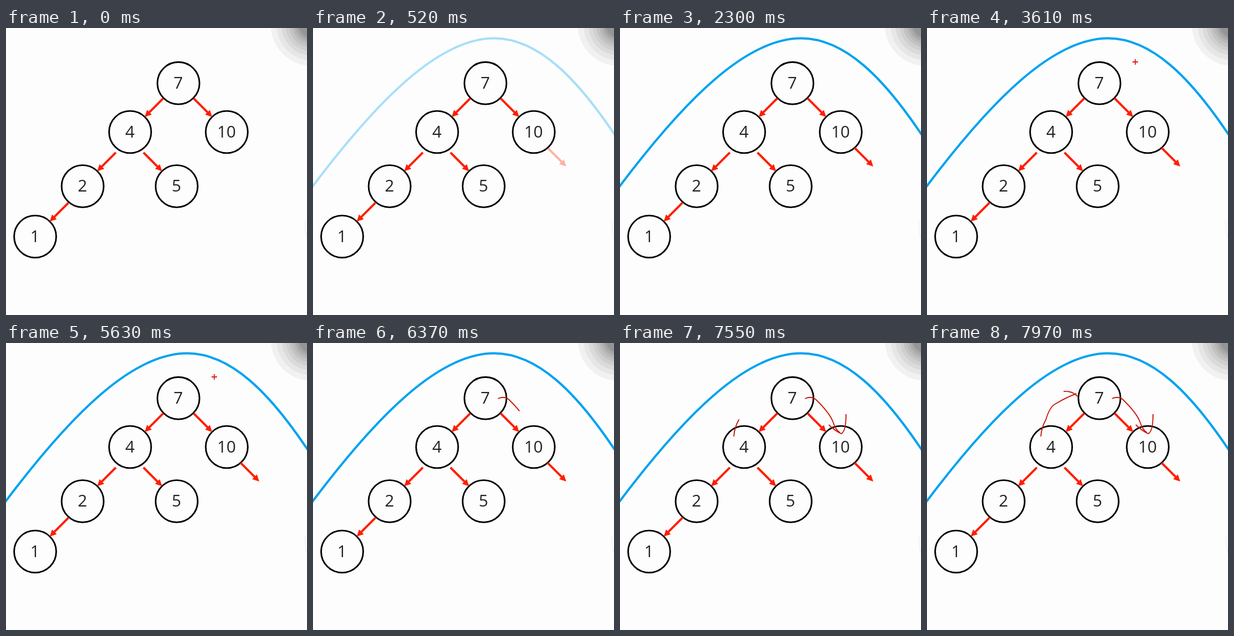
Write an HTML page that moves like this. It is 542x516 px and loops after 8000 ms.

```html
<!DOCTYPE html>
<html lang="en">
<head>
<meta charset="utf-8">
<title>Binary tree</title>
<style>
html, body { margin: 0; width: 100%; height: 100%; overflow: hidden; background: #fdfdfd; }
svg { display: block; width: 100vw; height: 100vh; }
text { font: 29.5px "Open Sans", "Noto Sans", sans-serif; fill: #222; text-anchor: middle; }
</style>
</head>
<body>
<svg viewBox="0 0 542 516" fill="none">
  <g id="shade"></g>
  <path d="M538 347Q538 364 541.5 378" stroke="#efefef" stroke-width="1.2"/>
  <g id="tree"></g>
  <g id="reveal">
    <path d="M-2 286.5C118 127 228 18.5 326 18.5C405 18.5 475 90 544 193" stroke="#00a2f0" stroke-width="4"/>
  </g>
  <g id="ink" stroke="#c81c0e" stroke-width="1.9" stroke-linejoin="round"></g>
  <path id="cursor" d="M-5 0H5M0 -5V5" stroke="#dc1e1e" stroke-width="1.8"/>
</svg>
<script>
const LOOP = 8000;
const CURSOR_ON = 3420;
const $ = id => document.getElementById(id);
const clamp = v => Math.max(0, Math.min(1, v));

function add(parent, tag, attrs, text) {
  const el = document.createElementNS('http://www.w3.org/2000/svg', tag);
  for (const k in attrs) el.setAttribute(k, attrs[k]);
  if (text) el.textContent = text;
  return parent.appendChild(el);
}

// Diagonal arrow that ends on the rim of the child at (cx, cy); side is -1 for a left child
function arrow(parent, cx, cy, side) {
  const g = add(parent, 'g', {
    transform: `translate(${cx - side * 26.2} ${cy - 27}) rotate(${side > 0 ? 45 : 135})`
  });
  add(g, 'path', { d: 'M-47.5 0H-10', stroke: '#ff1e00', 'stroke-width': 4 });
  add(g, 'path', { d: 'M0 0l-12 -6v12z', fill: '#ff1e00' });
}

function node(label, cx, cy, side) {
  add($('tree'), 'circle', { cx, cy, r: 37.9, stroke: '#000', 'stroke-width': 2.9 });
  add($('tree'), 'text', { x: cx - 0.4, y: cy + 9.6 }, label);
  if (side) arrow($('tree'), cx, cy, side);
}

// Stepped grey glow in the corner
for (let i = 0; i < 9; i++) {
  const v = 241 - i * 11.5;
  add($('shade'), 'circle', { cx: 550, cy: -5, r: 73 * 0.86 ** i, fill: `rgb(${v},${v},${v})` });
}

node(7, 310.5, 99.2);
node(4, 223.5, 187, -1);
node(10, 397.5, 187, 1);
node(2, 138, 284.5, -1);
node(5, 307.3, 284.5, 1);
node(1, 52.5, 375, -1);
arrow($('reveal'), 482.2, 276, 1);

// Pen moves in order: hovering eases in, drawing is steady and leaves ink
function move(from, to, d, draws) {
  const path = add($('ink'), 'path', { d, pathLength: 1, visibility: 'hidden' });
  return { from, to, path, draws, length: path.getTotalLength() };
}
const hover = (from, to, d) => move(from, to, d, false);
const draw = (from, to, d) => move(from, to, d, true);

const moves = [
  hover(5770, 6170, 'M375 61Q312 97 333 100'),
  draw(6170, 6560, 'M333 100Q344 95 352 101Q378 126 384 143Q388 156 396 161'),
  hover(6560, 6640, 'M396 161L376 147'),
  draw(6640, 6900, 'M376 147Q386 157 398 163Q407 160 407 128'),
  hover(6900, 7470, 'M407 128Q355 65 205 168'),
  draw(7470, 7740, 'M205 168Q206 152 214 138Q221 114 232 109Q248 99 269 91'),
  hover(7740, 7840, 'M269 91L246 87'),
  draw(7840, 7960, 'M246 87Q262 86 271 96')
];

function drawPen(t) {
  let now = moves[0];
  for (const m of moves) {
    const k = clamp((t - m.from) / (m.to - m.from));
    if (t >= m.from) now = m;
    if (m.draws) {
      m.path.setAttribute('visibility', k > 0 ? 'visible' : 'hidden');
      m.path.setAttribute('stroke-dasharray', `${k} 2`);
    }
  }
  const k = clamp((t - now.from) / (now.to - now.from));
  const { x, y } = now.path.getPointAtLength(k * k * now.length);
  $('cursor').setAttribute('transform', `translate(${x} ${y})`);
  $('cursor').setAttribute('visibility', t >= CURSOR_ON && !now.draws ? 'visible' : 'hidden');
}

function render(t) {
  $('reveal').setAttribute('opacity', clamp((t - 430) / 270));
  drawPen(t);
}

const start = performance.now();
function tick() {
  render((performance.now() - start) % LOOP);
  requestAnimationFrame(tick);
}
tick();
</script>
</body>
</html>
```
